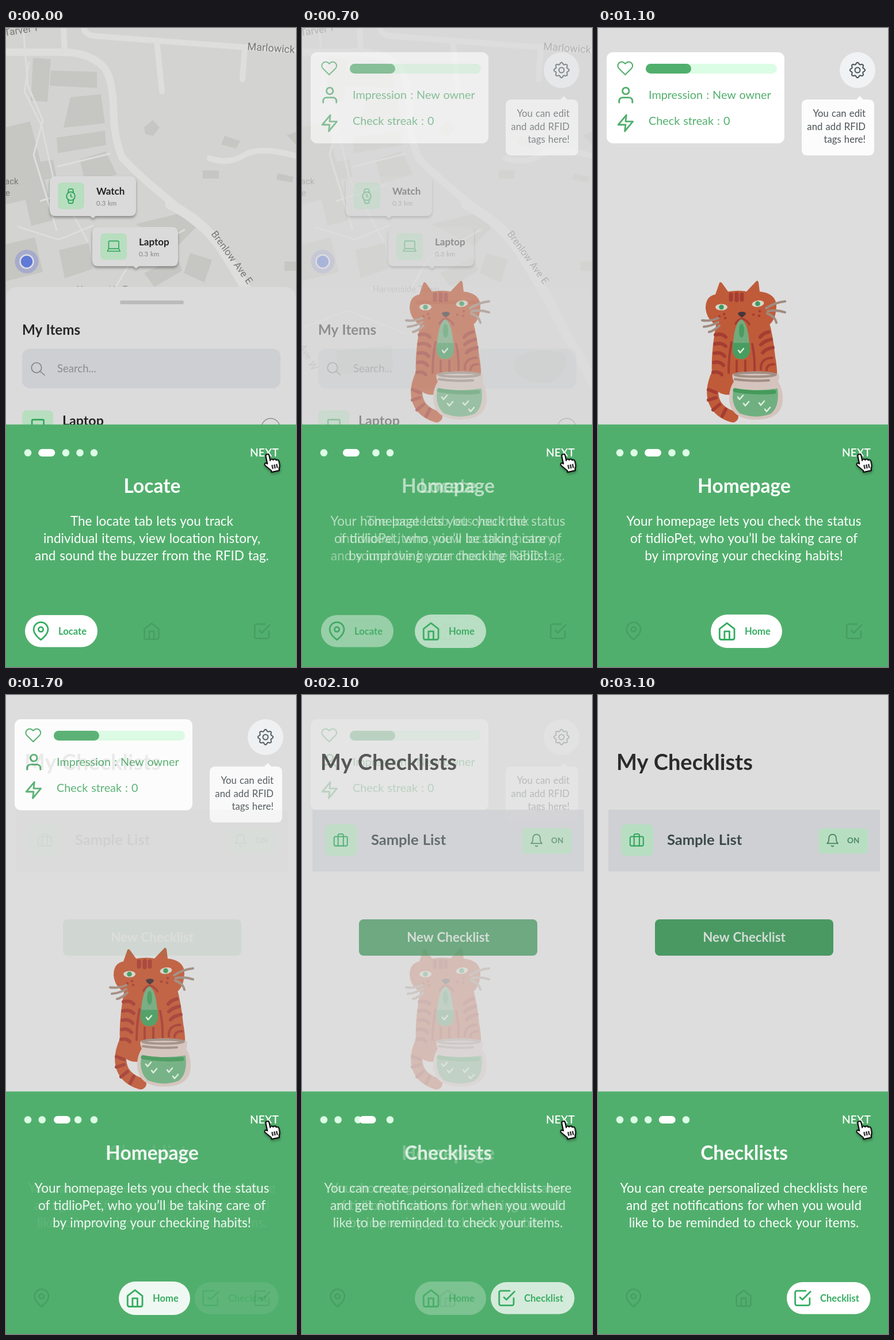
An HTML page that plays this animation: 504x1108 px, repeating every 3200 ms.

```html
<!DOCTYPE html>
<html lang="en">
<head>
<meta charset="utf-8">
<title>Onboarding</title>
<style>
html, body { margin: 0; width: 100%; height: 100%; overflow: hidden; background: #ddd; }
svg { display: block; width: 100vw; height: 100vh; font-family: Lato, "Open Sans", sans-serif; word-spacing: .06em; }
.b { font-weight: 700; }
.mid { text-anchor: middle; }
.end { text-anchor: end; }
.ico, .line { fill: none; stroke-linecap: round; stroke-linejoin: round; }
.ico { stroke-width: 2; }
.road { fill: none; stroke: #dededd; stroke-linecap: round; stroke-linejoin: round; }
.place { font-family: Roboto, sans-serif; fill: #777; font-size: 17px; }
.title { font-size: 33.5px; font-weight: 700; text-anchor: middle; }
.copy { font-size: 22.5px; text-anchor: middle; }
.nav { font-size: 16.6px; font-weight: 700; fill: #35ad62; }
.shadow { filter: drop-shadow(0 3px 2px #0005); }
</style>
</head>
<body>
<svg viewBox="0 0 504 1108" preserveAspectRatio="none">
<defs>
  <g id="pin"><path d="M21 10c0 7-9 13-9 13s-9-6-9-13a9 9 0 0 1 18 0z"/><circle cx="12" cy="10" r="3"/></g>
  <path id="house" d="M3 9l9-7 9 7v11a2 2 0 0 1-2 2H5a2 2 0 0 1-2-2zM9 22V12h6v10"/>
  <path id="check" d="M9 11l3 3L22 4M21 12v7a2 2 0 0 1-2 2H5a2 2 0 0 1-2-2V5a2 2 0 0 1 2-2h11"/>
  <g id="laptop"><rect x="4" y="4" width="16" height="12" rx="1.5"/><path d="M4 16l-2 4h20l-2-4"/></g>
  <path id="tick" class="line" d="M-5 0l3 4 6-7" stroke="#dcefdc" stroke-width="2.6"/>
</defs>

<rect width="504" height="1108" fill="#ddd"/>

<!-- map -->
<g class="loc">
  <rect width="504" height="690" fill="#d3d3d2"/>
  <g fill="#c6c6c2">
    <path d="M47 52l31 2-6 74-29-2zM78 74l80 2v28l-82-4zM112 120l53-5 7 50-72 8zM88 190l84-12 2 25-84 14z"/>
    <path d="M0 172l42-10 18 70 22-4 6 30-20 5 16 70-40 10-10-45-34 8zM0 375l50-12 14 60-64 16z"/>
    <path d="M128 228l45-14 20 40-55 16zM92 385l52-12 6 45-48 16zM225 340l75-18 30 24-32 32zM240 425l58-28 8 24-48 28z"/>
    <path d="M240 172l15-12 12 12-11 15-14-3zM380 187l27 9-7 13-26-7zM342 247h28v14h-28zM472 252l28 6-3 10-27-5zM320 390l38 12-13 39-36-16zM484 405h20v16h-20zM488 186l16-6v22z"/>
    <path d="M60 560l95-10 4 44-98 6zM372 572q40-22 84-8 12 30-22 50-44 8-66-22z"/>
  </g>
  <g class="road">
    <path stroke-width="3" stroke-dasharray="2 3" d="M22 345l70 22 60-25M40 60l-8 50 30 60 20 90 60 110"/>
    <path stroke-width="3" d="M30 0l8 100 26 60-16 60 40 130M90 240l90-22M60 300l90-30M190 450l30-50 90-50M0 520l80-30 100 40"/>
    <path stroke-width="10" d="M100 0l2 40M135 0q4 14 22 14l105 8 242 18M262 22l9 88M415 35l-4 54M354 226q35 12 64-8 30-12 86 4"/>
    <path stroke-width="13" d="M0 42h90q55-2 82 28 13 20 15 70 0 50 15 85 28 30 70 64l42 36"/>
    <path stroke-width="17" d="M285 306q60 30 92 80 45 70 80 140l50 90"/>
  </g>
  <g class="place">
    <text transform="translate(-2 14) rotate(-9)">Tarvel T</text>
    <text transform="translate(419 38) rotate(4)" font-size="18">Marlowick</text>
    <text transform="translate(356 357) rotate(54)">Brenlow Ave E</text>
    <text transform="translate(-5 552) rotate(62)" opacity=".7">Ave W</text>
    <text x="-2" y="271" font-size="15">ack</text><text x="-1" y="291" font-size="15">e</text>
    <text x="123" y="458" font-size="15" opacity=".7">Harvenside Town</text>
  </g>
  <circle cx="36" cy="405" r="20.500" fill="#a7abcb"/>
  <circle cx="36" cy="405" r="11.500" fill="#607ad5" stroke="#dedfe6" stroke-width="2.500"/>
</g>

<!-- map cards -->
<g class="loc">
  <g class="shadow" fill="#dadada">
    <path d="M86 257h130q10 0 10 10v49q0 10-10 10h-60l-5 4-5-4H86q-10 0-10-10v-49q0-10 10-10z"/>
    <path d="M160 345h129q10 0 10 10v48q0 10-10 10h-58l-5 4-5-4h-61q-10 0-10-10v-48q0-10 10-10z"/>
  </g>
  <g fill="#b8dec0"><rect x="90" y="268" width="46" height="46" rx="7"/><rect x="164" y="356" width="46" height="46" rx="7"/></g>
  <g class="ico" stroke="#31a45c">
    <g transform="translate(99 278) scale(1.13)" stroke-width="1.700"><circle cx="12" cy="12" r="6.500"/><path d="M12 9v3l2 1.500M16 17.500l-.4 3.500q-.3 2-2 2h-3.200q-1.700 0-2-2L8 17.500M8 6.500L8.400 3q.3-2 2-2h3.200q1.700 0 2 2l.4 3.500"/></g>
    <use href="#laptop" transform="translate(174 365) scale(1.1)" stroke-width="1.500"/>
  </g>
  <g class="b" font-size="17" fill="#242424"><text x="157" y="289">Watch</text><text x="231" y="377">Laptop</text></g>
  <g font-size="11.500" fill="#858589"><text x="157" y="308">0.3 km</text><text x="231" y="396">0.3 km</text></g>
</g>

<!-- item sheet -->
<g class="loc">
  <path d="M0 690V471q0-22 22-22h460q22 0 22 22v219z" fill="#dbdbdb"/>
  <rect x="198" y="472.500" width="111" height="6.500" rx="3.200" fill="#bbb"/>
  <text class="b" x="28" y="532" font-size="24.200" fill="#272727">My Items</text>
  <rect x="28" y="556" width="449" height="69" rx="14" fill="#cecfd2"/>
  <g class="line" stroke="#808186" stroke-width="1.600"><circle cx="53" cy="589" r="8.700"/><path d="M59 595l8 7"/></g>
  <text x="89" y="597" font-size="18.500" fill="#8b8c93">Search...</text>
  <rect x="28" y="663" width="54" height="54" rx="8" fill="#b8dec0"/>
  <use class="ico" href="#laptop" transform="translate(40 674) scale(1.280)" stroke="#31a45c"/>
  <text class="b" x="98" y="689" font-size="23.200" fill="#242424">Laptop</text>
  <circle cx="460" cy="693" r="16" fill="none" stroke="#909090" stroke-width="1.500"/>
</g>

<!-- home screen -->
<g class="home">
  <rect x="15" y="42" width="309" height="158" rx="11" fill="#fff"/>
  <rect x="83" y="62" width="228" height="17" rx="8.500" fill="#dcfde5"/>
  <rect x="83" y="62" width="79" height="17" rx="8.500" fill="#51af6d"/>
  <g class="ico" stroke="#51af6d">
    <path transform="translate(32.500 55) scale(1.230)" stroke-width="1.700" d="M20.840 4.610a5.500 5.500 0 0 0-7.780 0L12 5.670l-1.060-1.060a5.500 5.500 0 0 0-7.780 7.780L12 21.230l8.840-8.840a5.500 5.500 0 0 0 0-7.780z"/>
    <g transform="translate(31 99) scale(1.440)"><path d="M20 21v-2a4 4 0 0 0-4-4H8a4 4 0 0 0-4 4v2"/><circle cx="12" cy="7" r="4"/></g>
    <path transform="translate(31 148) scale(1.410)" d="M13 2L3 14h9l-1 8 10-12h-9z"/>
  </g>
  <g font-size="19.800" fill="#51af6d"><text x="88" y="123">Impression : New owner</text><text x="88" y="168">Check streak : 0</text></g>
  <circle cx="451" cy="73" r="31" fill="#f1f2f4"/>
  <g class="line" stroke="#46545a" stroke-width="2"><path id="gear"/><circle cx="451" cy="73" r="4.500"/></g>
  <path d="M364 124h85l6-6 6 6h9q10 0 10 10v77q0 10-10 10H364q-10 0-10-10v-77q0-10 10-10z" fill="#fcfcfc"/>
  <g class="end" font-size="16.700" fill="#4b5256"><text x="465" y="154">You can edit</text><text x="465" y="177">and add RFID</text><text x="465" y="199">tags here!</text></g>

  <!-- cat -->
  <path class="line" d="M207 600C190 638 202 664 234 674" stroke="#bf5b39" stroke-width="20"/>
  <path class="line" d="M192 627l13 5M192 645l13-4M200 662l11-9M216 673l6-12" stroke="#a63d32" stroke-width="6"/>
  <path d="M207 505Q194 570 199 612q4 24 28 24h80q8-30 1-66-4-40-12-65z" fill="#bf5b39"/>
  <path d="M204 462l7-20q2-3 5 1l10 14q18-3 32 0l17-18q3-2 4 2l2 16q29 3 29 26-1 27-17 34h-83q-21-9-23-31 0-21 17-24z" fill="#bf5b39"/>
  <g class="line" stroke="#a63d32">
    <path d="M231 462v9M241 461v11M250 462v9" stroke-width="7"/>
    <path d="M204 532q12-3 18 4M203 548q12-3 19 4M202 564q12-3 18 5M201 580q11-3 17 5M200 597q10-2 15 4M297 527q-10 2-15 9M301 540q-11 2-18 9M304 554q-12 2-18 9" stroke-width="6"/>
    <path d="M232 545q-5 25-5 53M241 577v22M256 577v20M268 548q5 23 4 48M283 592q-1-20 20-20M293 593q0-10 13-10" stroke-width="4"/>
    <path d="M239 513q3-7 11-9 9 2 13 10" stroke-width="3.500"/>
    <path d="M219 496h.1M221 503h.1M211 500h.1M270 497h.1M280 499h.1M281 491h.1" stroke-width="4.500"/>
  </g>
  <g fill="#d9d5c9"><ellipse cx="214.500" cy="484" rx="10.500" ry="5.500"/><ellipse cx="278" cy="478" rx="10.500" ry="5.500" transform="rotate(-8 278 478)"/></g>
  <g fill="#3f9a5c"><circle cx="214.500" cy="484" r="4.300"/><circle cx="277.500" cy="478" r="4.300"/></g>
  <path d="M243 494q7-4 14 0 0 4-7 8-7-4-7-8z" fill="#45363a"/>
  <path class="line" d="M209 503q-14 6-28 4M209 510q-12 7-25 8M211 516q-9 9-18 11M292 486q15-10 33-12M295 491q15-3 30 2M294 495q14 5 16 16" stroke="#a08b7f" stroke-width="4"/>
  <path d="M249 505c12 5 14 38 15 53q-1 16-15 16t-15-16c1-15 3-48 15-53z" fill="#73aa7d"/>
  <path d="M234.500 546h29l.5 12q-1 16-15 16t-15-16z" fill="#489c5f"/>
  <ellipse cx="249.500" cy="525" rx="4.500" ry="12" fill="#489c5f"/>
  <use href="#tick" x="249" y="559"/>
  <path d="M234 600q40-9 80 0 2 8-1 13 9 14 8 34-3 32-46 32-44 0-47-34-1-18 8-32-4-7-2-13z" fill="#d5c4bd"/>
  <g class="line" stroke="#a18e83"><ellipse cx="273" cy="601" rx="36" ry="3.500" stroke-width="4"/><path d="M238 609q28 4 59 2" stroke-width="4"/></g>
  <path d="M236 625q36 6 76 0 4 32-12 44-27 10-54-1-17-17-10-43z" fill="#70b080"/>
  <path class="line" d="M238 628q34 6 68 3" stroke="#449a5b" stroke-width="7"/>
  <use href="#tick" x="248" y="640"/><use href="#tick" x="258" y="651"/><use href="#tick" x="285" y="650"/><use href="#tick" x="295" y="661"/>
</g>

<!-- checklist screen -->
<g class="list">
  <text class="b" x="32" y="130" font-size="38" fill="#2b2b2b">My Checklists</text>
  <rect x="18" y="199" width="472" height="107" fill="#cfd0d4"/>
  <g fill="#b8dec2"><rect x="40" y="224" width="56" height="55" rx="9"/><rect x="383" y="231" width="86" height="44" rx="6"/></g>
  <g class="ico" stroke="#31a45c">
    <g transform="translate(53.500 237.500) scale(1.150)" stroke-width="1.800"><rect x="2" y="7" width="20" height="14" rx="2"/><path d="M16 21V5a2 2 0 0 0-2-2h-4a2 2 0 0 0-2 2v16"/></g>
    <path transform="translate(395 239.500) scale(1.050)" stroke-width="1.700" stroke="#45825d" d="M18 8A6 6 0 0 0 6 8c0 7-3 9-3 9h18s-3-2-3-9M13.700 21a2 2 0 0 1-3.400 0"/>
  </g>
  <text class="b" x="120" y="260" font-size="25.500" fill="#3c4a49">Sample List</text>
  <text class="b" x="433" y="257" font-size="13.500" fill="#4d8a66">ON</text>
  <rect x="99" y="389" width="310" height="63" rx="8" fill="#4a9963"/>
  <text class="b mid" x="254" y="428" font-size="22.300" fill="#d3ddd5">New Checklist</text>
</g>

<!-- guide panel -->
<rect y="687.500" width="504" height="421" fill="#51af6d"/>
<g fill="#dcfde5">
  <circle cx="38" cy="736.500" r="6.300"/><circle cx="153" cy="736.500" r="6.300"/>
  <circle id="dotA" cy="736.500" r="6.300"/><circle id="dotB" cy="736.500" r="6.300"/>
</g>
<rect id="active" y="730" width="29" height="13" rx="6.500" fill="#fff"/>
<text x="424" y="743" font-size="19.200" font-weight="600" fill="#fff">NEXT</text>

<g fill="#fff">
  <g class="loc">
    <text class="title" x="254" y="806">Locate</text>
    <g class="copy"><text x="253.500" y="863">The locate tab lets you track</text><text x="253.500" y="893">individual items, view location history,</text><text x="253.500" y="923">and sound the buzzer from the RFID tag.</text></g>
  </g>
  <g class="home">
    <text class="title" x="254" y="806">Homepage</text>
    <g class="copy"><text x="253.500" y="863">Your homepage lets you check the status</text><text x="253.500" y="893">of tidlioPet, who you’ll be taking care of</text><text x="253.500" y="923">by improving your checking habits!</text></g>
  </g>
  <g class="list">
    <text class="title" x="254" y="806">Checklists</text>
    <g class="copy"><text x="253.500" y="863">You can create personalized checklists here</text><text x="253.500" y="893">and get notifications for when you would</text><text x="253.500" y="923">like to be reminded to check your items.</text></g>
  </g>
</g>

<!-- tab bar -->
<g class="ico" stroke="#479f62" stroke-width="1.800">
  <use class="noloc" href="#pin" transform="translate(45.500 1029) scale(1.360)"/>
  <use class="nohome" href="#house" transform="translate(236.500 1029.500) scale(1.380)"/>
  <use class="nolist" href="#check" transform="translate(428 1029.500) scale(1.380)"/>
</g>
<g class="loc">
  <rect x="33" y="1018" width="126" height="55.500" rx="27.700" fill="#fff"/>
  <use class="ico" href="#pin" transform="translate(44 1029) scale(1.380)" stroke="#35ad62"/>
  <text class="nav" x="91" y="1052">Locate</text>
</g>
<g class="home">
  <rect x="196" y="1017" width="124" height="58" rx="29" fill="#fff"/>
  <use class="ico" href="#house" transform="translate(207 1029) scale(1.430)" stroke="#35ad62"/>
  <text class="nav" x="255" y="1052">Home</text>
</g>
<g class="list">
  <rect x="328" y="1018" width="145.500" height="55.500" rx="27.700" fill="#fff"/>
  <use class="ico" href="#check" transform="translate(338.500 1029) scale(1.400)" stroke="#35ad62"/>
  <text class="nav" x="386" y="1052">Checklist</text>
</g>

<!-- pointer -->
<g class="shadow" transform="translate(454 740) rotate(-12)" stroke="#000" stroke-width="2" stroke-linejoin="round">
  <path fill="#fff" d="M-3 2q0-3 3-3t3 3v9q0-2 2.500-2t2.800 2q.7-1 2.700-1t2.300 2.500q3.700-1 4.200 2.500v6q0 4-2.500 7v3H1v-3L-7 18q-2-3 .5-4.500 1.500-.5 3.500 2z"/>
  <path d="M4.500 19v7M8.500 19v7M12.500 19v7"/>
</g>
</svg>
<script>
const LOOP = 3200, STEP = 100, FADE = 800, TO_HOME = 250, TO_LIST = 1560;
const $ = id => document.getElementById(id);
const fade = (name, o) => document.querySelectorAll('.' + name).forEach(e => e.setAttribute('opacity', o));
const ease = x => { x = Math.min(1, Math.max(0, x)); return x * x * (3 - 2 * x); };

// eight-toothed cog outline
$('gear').setAttribute('d', 'M' + Array.from({ length: 96 }, (_, i) => {
  const a = i * Math.PI / 48, r = 11.7 + 1.5 * Math.cos(8 * a);
  return (451 + r * Math.cos(a)).toFixed(1) + ' ' + (73 + r * Math.sin(a)).toFixed(1);
}).join('L') + 'Z');

function draw(now) {
  const t = Math.floor(now % LOOP / STEP) * STEP;
  const h = ease((t - TO_HOME) / FADE), l = ease((t - TO_LIST) / FADE);
  const shown = { loc: 1 - h, home: h * (1 - l), list: l };
  for (const name in shown) {
    fade(name, shown[name]);
    fade('no' + name, 1 - shown[name]);
  }
  $('active').setAttribute('x', 56.3 + 24.7 * (h + l));
  $('dotA').setAttribute('cx', 104 - 41.3 * h);
  $('dotB').setAttribute('cx', 128.5 - 41.3 * l);
  requestAnimationFrame(() => draw(performance.now()));
}
draw(performance.now());
</script>
</body>
</html>
```
